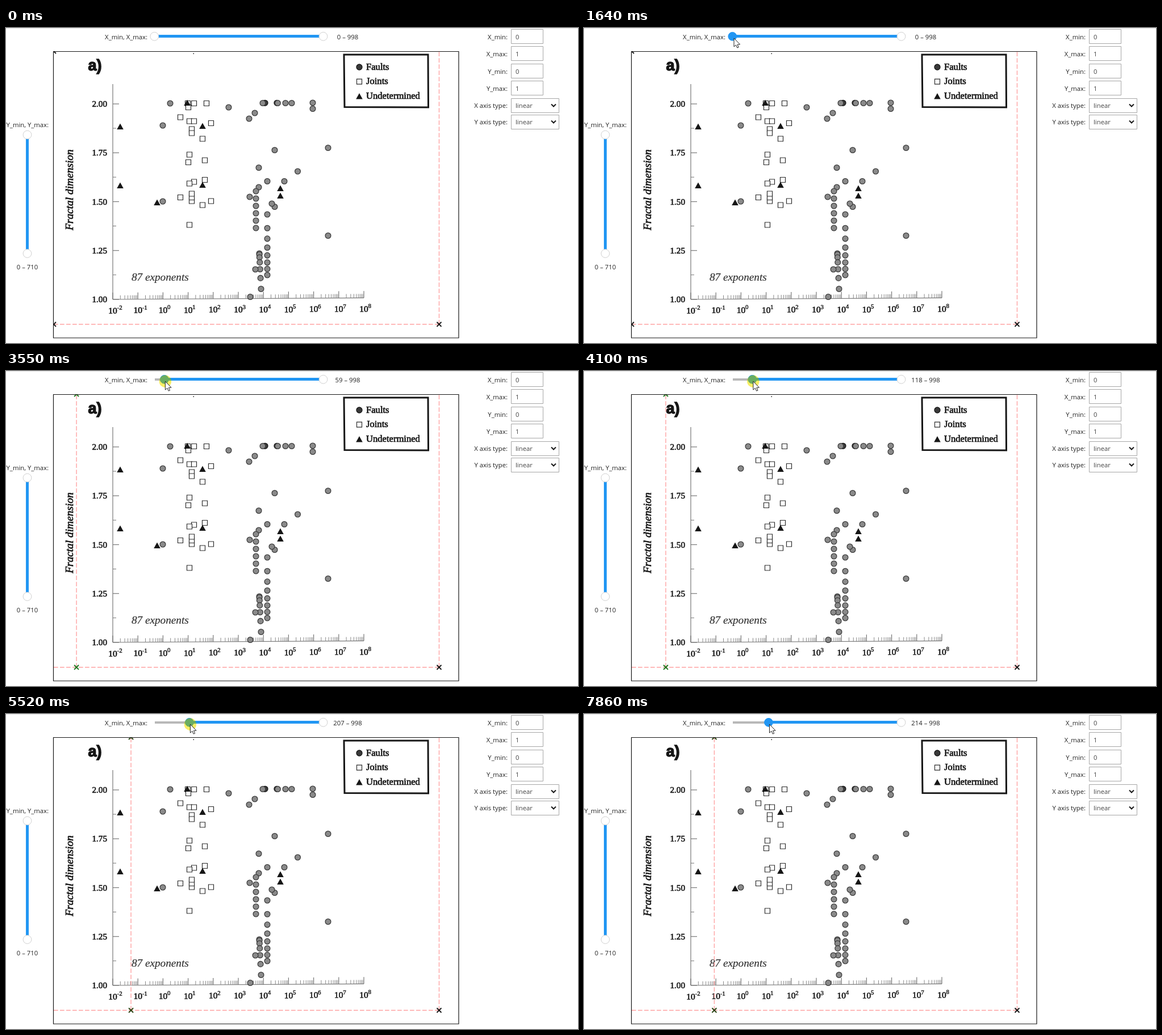
Animation, 1007 px wide and 556 px high, one loop 8 s. Source, as an HTML page with a canvas:

```html
<!DOCTYPE html>
<html lang="en">
<head>
<meta charset="utf-8">
<title>Axis calibration</title>
<style>
  html, body { margin: 0; width: 100%; height: 100%; overflow: hidden; background: #fff; }
  canvas { display: block; width: 1007px; height: 556px; }
</style>
</head>
<body>
<canvas id="stage" width="1007" height="556"></canvas>
<script>
const W = 1007, H = 556, LOOP = 8000, MAX = 998;
const GRAB = 1990, RELEASE = 7130, TICK = 67.8, LAG = 280;
const UI = '"Open Sans", "Noto Sans", sans-serif';
const SERIF = '"Liberation Serif", "Noto Serif", serif';
const BLUE = '#2196f3', INK = '#161616', PINK = '#ffa3a3';
const screen = document.getElementById('stage').getContext('2d');
const backdrop = document.createElement('canvas');
backdrop.width = W;
backdrop.height = H;
let c = backdrop.getContext('2d');

// Eased-out progress from 0 to 1 between two times
function ease(t, from, to) {
  const p = Math.min(1, Math.max(0, (t - from) / (to - from)));
  return 1 - (1 - p) ** 1.6;
}

// Three pulls to the right, then a small correction back
const valueAt = t => 59 * ease(t, GRAB, 3270) + 148 * ease(t, 3560, 5520)
  + 18 * ease(t, 5520, 5850) - 11 * ease(t, 6130, 6560);

function approach(t) {
  const p = ease(t, 200, 960), q = ease(t, 960, 1570);
  return [864 - 749 * p + 149 * q, 472 - 267 * p - 187 * q];
}

function paint(fill, stroke, width) {
  if (fill) { c.fillStyle = fill; c.fill(); }
  if (stroke) { c.strokeStyle = stroke; c.lineWidth = width; c.stroke(); }
}

function line(x0, y0, x1, y1, color, width = 1) {
  c.beginPath();
  c.moveTo(x0, y0);
  c.lineTo(x1, y1);
  paint(null, color, width);
}

function dashed(x0, y0, x1, y1) {
  c.setLineDash([7.7, 3.3]);
  line(x0, y0, x1, y1, PINK, 1.4);
  c.setLineDash([]);
}

function shape(points, fill, stroke, width = 1) {
  c.beginPath();
  points.forEach(([x, y]) => c.lineTo(x, y));
  c.closePath();
  paint(fill, stroke, width);
}

function disc(x, y, r, fill, stroke, width = 1) {
  c.beginPath();
  c.arc(x, y, r, 0, Math.PI * 2);
  paint(fill, stroke, width);
}

function box(x, y, w, h, fill, stroke, width = 1) {
  c.beginPath();
  c.rect(x, y, w, h);
  paint(fill, stroke, width);
}

function text(s, x, y, font, color, align = 'left', weight = 0) {
  c.font = font;
  c.textAlign = align;
  c.fillStyle = color;
  c.fillText(s, x, y);
  if (weight) {
    c.strokeStyle = color;
    c.lineWidth = weight;
    c.strokeText(s, x, y);
  }
}

const label = (s, x, y, align, color = '#222') => text(s, x, y, '11.3px ' + UI, color, align);
const serif = (s, x, y, size, align = 'left', weight = 0.6, style = '') =>
  text(s, x, y, `${style} ${size}px ${SERIF}`, INK, align, weight);

const fault = (x, y) => disc(x, y, 4.9, '#8a8a8a', '#3c3c3c', 1.3);
const darkFault = (x, y) => disc(x, y, 5, '#3a3a3a', INK, 1.3);
const joint = (x, y) => box(x - 4.5, y - 4.5, 9, 9, '#fff', '#2c2c2c', 1.2);
const other = (x, y) => shape([[x, y - 5.5], [x + 5.8, y + 5], [x - 5.8, y + 5]], INK);
const knob = (x, y, hot) => disc(x, y, 7.4, hot ? BLUE : '#fff', hot ? BLUE : '#d0d0d0');

// n marks from one point to another; power bunches them to one end
function run(mark, x0, y0, x1, y1, n = 2, power = 1) {
  for (let i = 0; i < n; i++) {
    const p = (i / (n - 1)) ** power;
    mark(x0 + (x1 - x0) * p, y0 + (y1 - y0) * p);
  }
}
const column = (mark, x, y0, y1, n, power) => run(mark, x, y0, x, y1, n, power);
const row = (mark, y, x0, x1, n, power) => run(mark, x0, y, x1, y, n, power);

function drawMarks() {
  row(joint, 133, 320, 331);
  run(joint, 321, 140, 353, 133);
  column(joint, 307, 157.5, 299);
  row(joint, 164.5, 323, 331);
  column(joint, 361, 168, 305.5);
  column(joint, 327, 178.5, 185.5);
  column(joint, 346, 195.5, 312.5);
  run(joint, 323, 223.5, 321, 237);
  column(joint, 350, 233.5, 268);
  run(joint, 331, 271.5, 323, 274.5);
  column(joint, 327, 305.5, 292.5, 3);
  joint(323, 347.5);

  row(darkFault, 132.3, 456, 477);
  row(fault, 132.5, 452, 503, 4, 0.6);
  run(fault, 289, 133, 392, 140);
  column(fault, 540, 132, 142.5);
  run(fault, 428, 160, 438, 150);
  column(fault, 276, 172, 306);
  column(fault, 567, 211.5, 366.5);
  run(fault, 473, 215.5, 513.5, 253);
  column(fault, 445, 246.5, 281);
  run(fault, 490, 270.5, 429, 298);
  run(fault, 473, 315.5, 468, 310);
  column(fault, 440, 353, 288, 6);
  column(fault, 460, 270.5, 436, 9, 0.5);
  run(fault, 446, 398, 449, 460.5, 7, 2);
  run(fault, 439, 426, 430, 474.5);

  column(other, 201, 174, 278);
  column(other, 346, 173, 277);
  column(other, 483, 283, 296);
  run(other, 319, 132, 266, 308);
}

function drawAxes() {
  const gray = '#777', decade = 44.2;
  line(188, 99, 188, 479, gray, 1.2);
  for (let i = 0; i < 5; i++) {
    const y = 134 + i * 86.25;
    line(188, y, 199, y, gray, 1.2);
    if (i < 4) line(188, y + 43, 194, y + 43, gray);
    serif((2 - i * 0.25).toFixed(2), 178, y + 5, 15.2, 'right');
  }
  // The scanned baseline rises slightly to the right
  const base = x => 479 - (x - 188) * 0.006;
  line(188, 479, 630, base(630), gray, 1.2);
  for (let k = 0; k <= 10; k++) {
    const x = 188 + k * decade, y = base(x);
    line(x, y, x, y - 12, gray, 1.2);
    for (let d = 2; d < 10 && k < 10; d++) {
      const m = x + Math.log10(d) * decade;
      line(m, base(m), m, base(m) - 7, '#888');
    }
    serif('10', x - 7.7, y + 24.5, 15.5);
    serif(String(k - 2), x + 7.5, y + 18, 11, 'left', 0.4);
  }
}

function drawLegend() {
  shape([[595, 47], [743, 47], [743.5, 140], [596, 139.5]], '#fff', INK, 3);
  [['Faults', darkFault], ['Joints', joint], ['Undetermined', other]].forEach(([s, mark], i) => {
    const y = 69 + i * 25.7;
    mark(622, y);
    serif(s, 634, y + 4.7, 16.6, 'left', 0.7);
  });
}

function drawForm() {
  ['X_min:', 'X_max:', 'Y_min:', 'Y_max:'].forEach((s, i) => {
    const y = 2.5 + Math.floor(i * 30.5);
    label(s, 883, y + 17, 'right');
    box(889.5, y, 56, 25, '#fff', '#a6a6a6');
    label(String(i % 2), 897, y + 17, 'left', '#444');
  });
  ['X axis type:', 'Y axis type:'].forEach((s, i) => {
    const y = 124.5 + i * 29;
    label(s, 883, y + 16, 'right');
    box(889.5, y, 84, 25, '#fff', '#a6a6a6');
    label('linear', 897, y + 16.5, 'left', '#444');
    line(960, y + 10, 964.5, y + 14.5, INK, 2);
    line(963.5, y + 14.5, 968, y + 10, INK, 2);
  });
}

function drawBackdrop() {
  box(0, 0, W, H, '#fff');
  line(0, 0.5, W, 0.5, '#e6e6e6');
  label('X_min, X_max:', 249, 19.5, 'right');
  label('Y_min, Y_max:', 75, 175, 'right');
  line(37.5, 188, 37.5, 398, BLUE, 5);
  knob(37.5, 188.5);
  knob(37.5, 398);
  label('0 – 710', 37.5, 425.5, 'center');
  drawForm();

  text('a)', 144.5, 75, 'bold 27px "Liberation Sans", sans-serif', INK, 'left', 1.4);
  box(329.5, 44.5, 1.5, 1.5, INK);
  c.save();
  c.translate(118, 357);
  c.rotate(-Math.PI / 2);
  serif('Fractal dimension', 0, 0, 19.4, 'left', 0.7, 'italic');
  c.restore();
  text('87 exponents', 221, 446, 'italic 19.2px ' + SERIF, '#333', 'left', 0.2);
  drawAxes();
  drawLegend();
  drawMarks();
}

function cross(x, y, color) {
  line(x - 4, y - 4, x + 4, y + 4, color, 1.8);
  line(x - 4, y + 4, x + 4, y - 4, color, 1.8);
}

function drawGuides(t) {
  const value = valueAt(t - LAG), x = 84 + value * 678 / MAX;
  const color = value === 0 ? INK : t < 5250 ? '#1c761c' : '#26400f';
  c.save();
  c.beginPath();
  c.rect(84, 41, 713, 506);
  c.clip();
  dashed(84, 523, 762, 523);
  dashed(762.5, 523, 762.5, 41);
  if (value > 0) dashed(x, 523, x, 41);
  cross(x, 41, color);
  cross(x, 523, color);
  cross(762.5, 523, INK);
  c.restore();
  box(83.5, 41.5, 713.5, 505.5, null, INK, 1.2);
}

function drawCursor(x, y) {
  const outline = [[0, 0], [0, 15], [3.5, 12], [5.8, 17], [8.2, 16], [6, 11.2], [10.6, 11]];
  shape(outline.map(([dx, dy]) => [x + dx, y + dy]), '#fff', '#222');
}

function drawHalo(x, y) {
  c.globalCompositeOperation = 'multiply';
  disc(x, y, 10.7, '#f8f070');
  c.globalCompositeOperation = 'source-over';
  disc(x, y, 10.7, 'rgba(245,235,80,.35)');
}

function drawSlider(t) {
  const value = valueAt(t), x = 261.3 + value * 297 / MAX;
  line(262, 15, x, 15, '#b8b8b8', 4);
  line(x, 14.5, 558.5, 14.5, BLUE, 5);
  knob(558.5, 14.8);
  knob(x, 14.8, t > 1550);
  label(`${Math.round(value)} – ${MAX}`, 601.5, 19.5, 'center');
  if (t < 200) return;
  const [cx, cy] = t < GRAB ? approach(t) : [x + 1.5, 18.2];
  if (t >= GRAB && t < RELEASE) drawHalo(cx, cy);
  drawCursor(cx, cy);
}

function frame(now) {
  const raw = Math.max(0, now - start) % LOOP;
  // The picture advances in short even steps
  const t = GRAB + Math.floor((raw - GRAB) / TICK) * TICK;
  c.drawImage(backdrop, 0, 0);
  drawGuides(t);
  drawSlider(t);
  requestAnimationFrame(frame);
}

drawBackdrop();
c = screen;
const start = performance.now();
frame(start);
</script>
</body>
</html>
```
